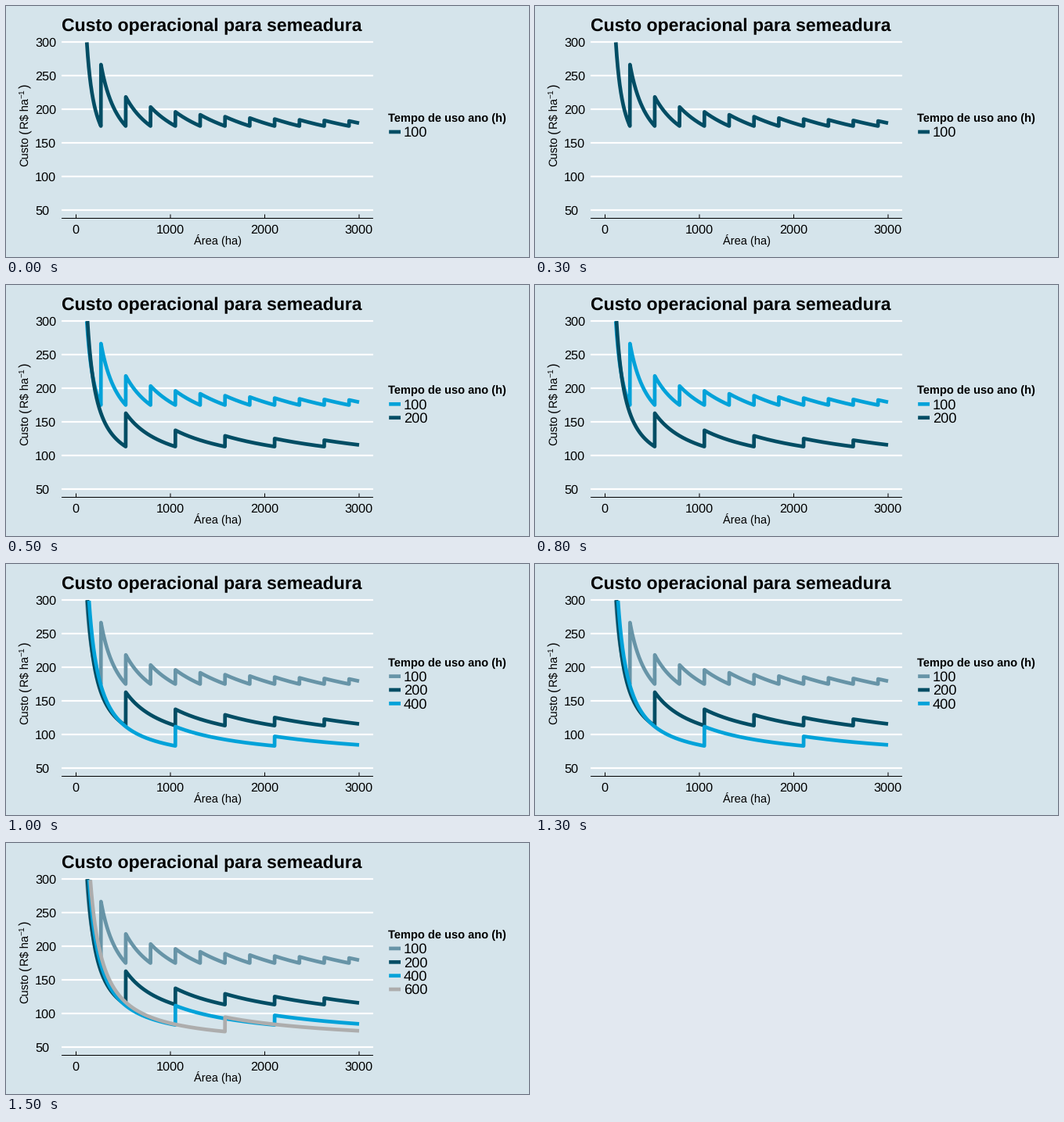
Recreate the animation shown at these times as a matplotlib script. Size 668x321 px, loop 2 s.

```python
import matplotlib.pyplot as plt
import numpy as np
from matplotlib.animation import FuncAnimation

W, H, DPI = 668, 321, 72
BG = "#d5e4eb"
NAVY, BLUE, STEEL, GRAY = "#014d64", "#01a2d9", "#6794a7", "#adadad"
PALETTES = [[NAVY], [BLUE, NAVY], [STEEL, NAVY, BLUE], [STEEL, NAVY, BLUE, GRAY]]

HOURS = [100, 200, 400, 600]
LOWEST = [175, 113.2, 83, 73.1]   # cost per ha at full use
SLOPE = [82, 47.3, 28.1, 21.2]    # rise as idle capacity grows
HA_PER_HOUR = 2.63
CURVATURE = 700_000
LINE = 4.7

plt.rcParams["font.family"] = "Liberation Sans"
plt.rcParams["text.hinting"] = "none"

fig = plt.figure(figsize=(W / DPI, H / DPI), dpi=DPI, facecolor=BG)
ax = fig.add_axes([0, 0, 1, 1])
ax.set(xlim=(0, W), ylim=(H, 0))
ax.axis("off")


def px(area):
    return 89.5 + area * 0.1205


def py(cost):
    return 46 + (300 - cost) * 0.86


def label(x, y, s, size, **kw):
    return ax.text(x, y, s, fontsize=size, color="black", va="baseline", **kw)


def stroke(x, y, color, width, **kw):
    line, = ax.plot(x, y, color=color, lw=width, solid_capstyle="butt",
                    solid_joinstyle="round", snap=False, **kw)
    return line


def cost_curve(hours, lowest, slope):
    """Cost per ha, with one more machine each time capacity is used up."""
    capacity = hours * HA_PER_HOUR
    area = np.arange(90, 3001)
    idle = np.ceil(area / capacity) * capacity / area - 1
    cost = lowest + slope * idle + CURVATURE * (idle / capacity) ** 2
    keep = cost <= 300
    return px(area[keep]), py(cost[keep])


# Grid and axes
for value in range(50, 301, 50):
    stroke([71, 469], [py(value)] * 2, "white", 2.2, zorder=1)
    label(37, py(value) + 5.7, str(value), 16.2)
stroke([71, 469], [271.5] * 2, "black", 1, zorder=4)
for value in range(0, 3001, 1000):
    stroke([px(value)] * 2, [266.5, 271.5], "black", 1, zorder=4)
    label(px(value) - 0.3, 290.4, str(value), 16.2, ha="center")

# Titles
label(71.2, 32, "Custo operacional para semeadura", 22.95, weight="bold")
label(270.3, 305, "Área (ha)", 14.67, ha="center")
for x, y, part, size in [(28.6, 205.4, "Custo", 14.67), (28.6, 162.6, "(", 16.5),
                         (28.6, 157.2, "R$ ha", 14.67),
                         (23.2, 117.6, "\u22121", 10.3), (28.6, 105.4, ")", 16.5)]:
    label(x, y, part, size, rotation=90, rotation_mode="anchor")

# Curves and legend
curves = [stroke(*cost_curve(*row), NAVY, LINE, zorder=3)
          for row in zip(HOURS, LOWEST, SLOPE)]
keys = [stroke([], [], NAVY, LINE, zorder=3) for _ in HOURS]
names = [label(508, 0, str(h), 18.2) for h in HOURS]
legend_title = label(488, 0, "Tempo de uso ano (h)", 14.67, weight="bold")


def draw(i):
    colors = PALETTES[i]
    top = 161 - 8.7 * (len(colors) - 1)
    legend_title.set_y(top - 13)
    for k, (curve, key, name) in enumerate(zip(curves, keys, names)):
        shown = k < len(colors)
        for part in (curve, key, name):
            part.set_visible(shown)
        if shown:
            y = top + 17.4 * k
            curve.set_color(colors[k])
            key.set_color(colors[k])
            key.set_data([489.2, 504], [y, y])
            name.set_y(y + 6.2)
    return [*curves, *keys, *names, legend_title]


anim = FuncAnimation(fig, draw, frames=4, interval=500, repeat=True,
                     repeat_delay=0, blit=False)
plt.show()
```
